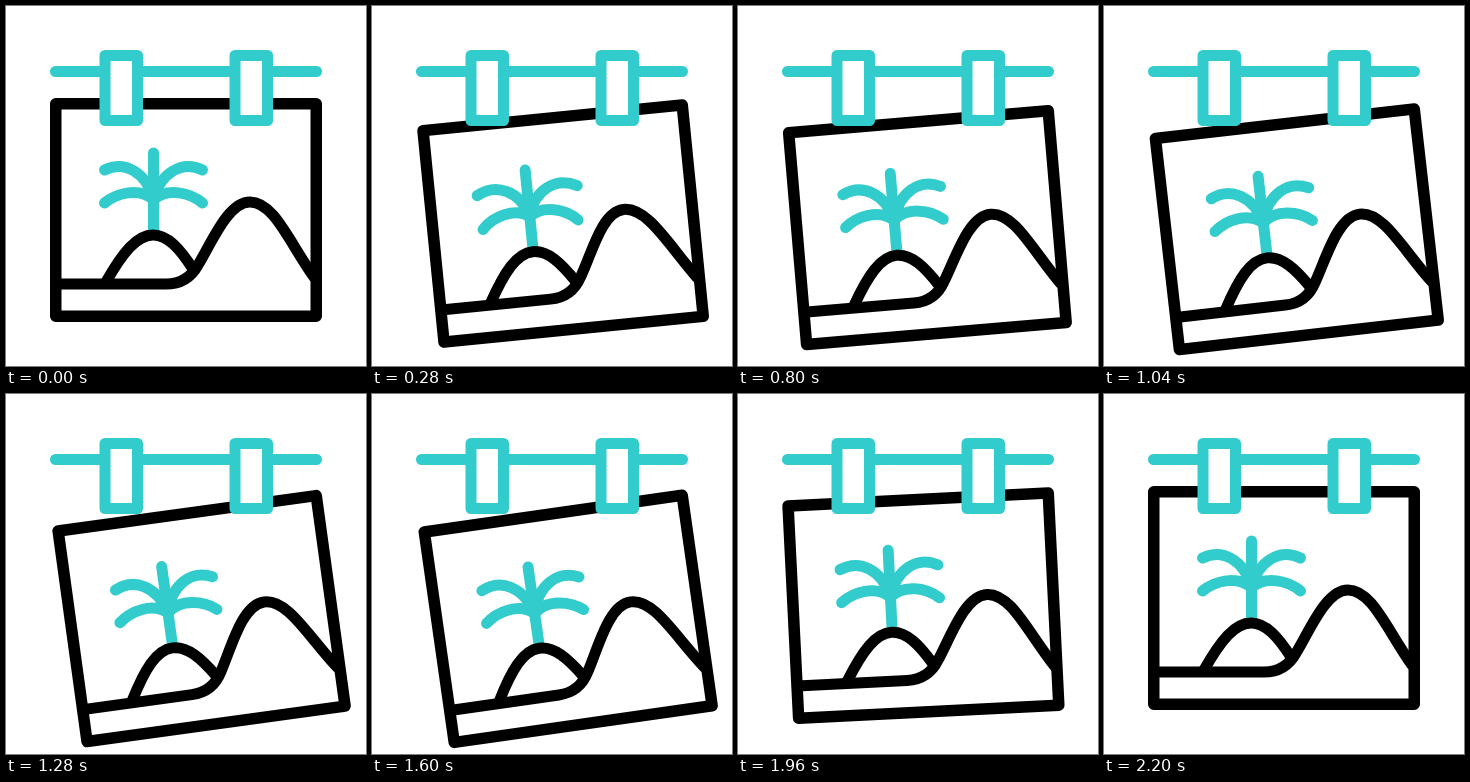
Recreate the animation shown at these times as an HTML page. Size 360 by 360 pixels, loop 2.4 s.

```html
<!DOCTYPE html>
<html lang="en">
<head>
<meta charset="utf-8">
<title>Swinging picture</title>
<style>
  html, body { margin: 0; width: 100%; height: 100%; overflow: hidden; background: #fff; }
  svg { display: block; width: 100vw; height: 100vh; }
  .ink, .teal { fill: none; stroke: #000; stroke-width: 11; stroke-linecap: round; stroke-linejoin: round; }
  .teal { stroke: #33cccc; }
  .frame { stroke-width: 11.5; }
  .clip { fill: #fff; }
</style>
</head>
<body>
<svg viewBox="0 0 360 360">
  <g id="picture">
    <path class="teal" d="M147.5 147V226"/>
    <path class="teal" id="leaves"/>
    <path class="ink" d="M100 276C117 246 131 229 147 229C162 229 174 243 187 263"/>
    <path class="ink" id="hill"/>
    <rect class="ink frame" x="49.75" y="97.75" width="260.5" height="212.5"/>
  </g>
  <path class="teal" d="M49.5 65.5H310.5"/>
  <rect class="teal clip" x="99" y="49.5" width="32.500" height="65"/>
  <rect class="teal clip" x="229" y="49.5" width="32.500" height="65"/>
</svg>
<script>
  const LOOP = 2400, STEP = 40;
  const picture = document.getElementById('picture');
  const leaves = document.getElementById('leaves');
  const hill = document.getElementById('hill');

  // time, tilt in degrees, drop in px, bend 0..1, easing power
  const keys = [
    [0, 0, 0, 0, 1],
    [480, 9.1, 1.9, 1, 1],
    [800, 4.85, 7, 0, 1],
    [1440, 8.1, 3.6, 0, 0.7],
    [1600, 8.1, 3.6, 0, 1],
    [2200, 0, 0, 0, 1],
    [LOOP, 0, 0, 0, 1]
  ];

  const smooth = u => u * u * (3 - 2 * u);

  function pose(t) {
    const i = keys.findIndex(k => k[0] > t);
    const a = keys[i - 1], b = keys[i];
    const u = smooth(Math.pow((t - a[0]) / (b[0] - a[0]), b[4]));
    return [1, 2, 3].map(n => a[n] + (b[n] - a[n]) * u);
  }

  // side is -1 for left, 1 for right
  function leafPair(side, bend) {
    const p = (dx, y) => `${147.5 + side * dx} ${y}`;
    return `M${p(49 + 2 * bend, 164 + 6 * bend)}` +
      `C${p(28 + 2 * bend, 154 + 4 * bend)} ${p(8, 167 + 2 * bend)} ${p(0, 192)}` +
      `M${p(49 - 2 * bend, 197 + 8 * bend)}` +
      `C${p(37, 187 + 5 * bend)} ${p(14, 181 + 3 * bend)} ${p(0, 194)}`;
  }

  // the hill lags behind the leaves, so its lean grows late
  function hillPath(bend) {
    const lean = 10 * bend ** 3;
    return `M50 278H160C178 278 187 268 192 259` +
      `C206 236 ${222 - lean} 196 ${244 - lean} 196C${268 - lean} 196 283 236 308 271`;
  }

  function draw(now) {
    const t = Math.floor((now % LOOP) / STEP) * STEP;
    const [tilt, drop, bend] = pose(t);
    picture.setAttribute('transform', `translate(0 ${drop}) rotate(${-tilt} 310 98)`);
    leaves.setAttribute('d', leafPair(-1, bend) + leafPair(1, bend));
    hill.setAttribute('d', hillPath(bend));
  }

  const start = performance.now();
  function tick() {
    draw(performance.now() - start);
    requestAnimationFrame(tick);
  }
  tick();
</script>
</body>
</html>
```
